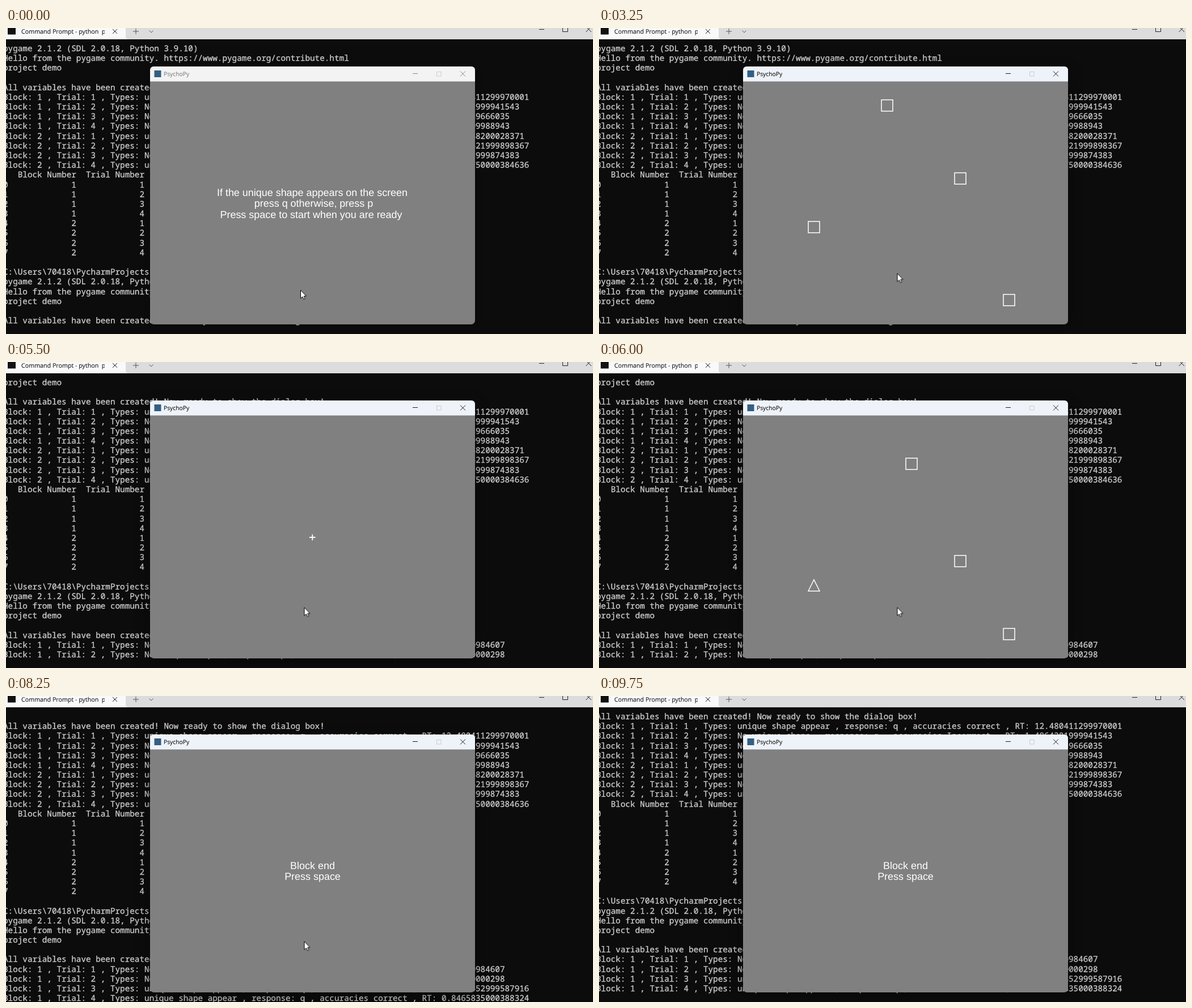
Write an HTML page that moves like this. It is 1035 by 541 pixels and loops after 10000 ms.

```html
<!DOCTYPE html>
<html lang="en">
<head>
<meta charset="utf-8">
<title>Search task</title>
<style>
  html, body { margin: 0; width: 100%; height: 100%; overflow: hidden; background: #0c0c0c; }
  svg { display: block; width: 1035px; height: 541px; }
  text { white-space: pre; text-rendering: geometricPrecision; }

  .log {
    font: 14.325px "Noto Sans Mono", "DejaVu Sans Mono", monospace;
    fill: #d0d0d0; stroke: #d0d0d0; stroke-width: .3; font-variant-ligatures: none;
  }
  .ui { font-family: "Open Sans", "Noto Sans", sans-serif; }
  .ui text { stroke: currentColor; stroke-width: .15; }
  .message { font: 17.95px "Liberation Sans", Arial, sans-serif; fill: #fff; text-anchor: middle; }
  .line { fill: none; stroke: currentColor; }
  .stimulus { fill: none; stroke: #fff; stroke-width: 1.5; }

  /* Every change is a hard cut on one shared ten-second clock. */
  .log, .cover, .pointer, .window, .frame, .bar, .scene {
    animation: 10s step-end infinite;
  }
  .scene { visibility: hidden; }
  .log { animation-name: scroll; }
  .cover { animation-name: cover; }
  .pointer { animation-name: pointer; }
  .window { animation-name: ink; }
  .frame { animation-name: shadow; }
  .bar { animation-name: bar; }
  .intro { animation-name: intro; }
  .begin { animation-name: begin; }
  .cross { animation-name: cross; }
  .end { animation-name: end; }
  .trial1 { animation-name: trial1; }
  .trial2 { animation-name: trial2; }
  .trial3 { animation-name: trial3; }
  .trial4 { animation-name: trial4; }

  @keyframes scroll {
    0% { transform: translateY(0); }
    42.5% { transform: translateY(-17.18px); }
    55% { transform: translateY(-34.36px); }
    70% { transform: translateY(-51.54px); }
    85%, 100% { transform: translateY(-68.72px); }
  }
  @keyframes cover {
    0%, 85%, 100% { visibility: visible; }
    82.5% { visibility: hidden; }
  }
  @keyframes pointer {
    0% { transform: translate(519px, 463px); visibility: visible; }
    2.5% { transform: translate(525.5px, 433.5px); visibility: visible; }
    97.5%, 100% { transform: translate(525.5px, 433.5px); visibility: hidden; }
  }
  @keyframes ink {
    0% { color: #858585; }
    12.5% { color: #444; }
    15%, 100% { color: #1a1a1a; }
  }
  @keyframes shadow {
    0% { filter: drop-shadow(0 2px 5px rgba(0, 0, 0, .3)); }
    12.5%, 100% { filter: drop-shadow(0 6px 12px rgba(0, 0, 0, .4)); }
  }
  @keyframes bar {
    0% { fill: #f3f3f3; }
    12.5% { fill: #f0f3f7; }
    15%, 100% { fill: #eef3f9; }
  }
  @keyframes intro { 0% { visibility: visible; } 17.5%, 100% { visibility: hidden; } }
  @keyframes begin { 0%, 27.5%, 100% { visibility: hidden; } 17.5% { visibility: visible; } }
  @keyframes cross {
    0%, 32.5%, 47.5%, 60%, 75%, 100% { visibility: hidden; }
    27.5%, 42.5%, 55%, 70% { visibility: visible; }
  }
  @keyframes trial1 { 0%, 42.5%, 100% { visibility: hidden; } 32.5% { visibility: visible; } }
  @keyframes trial2 { 0%, 55%, 100% { visibility: hidden; } 47.5% { visibility: visible; } }
  @keyframes trial3 { 0%, 70%, 100% { visibility: hidden; } 60% { visibility: visible; } }
  @keyframes trial4 { 0%, 82.5%, 100% { visibility: hidden; } 75% { visibility: visible; } }
  @keyframes end { 0% { visibility: hidden; } 82.5%, 100% { visibility: visible; } }
</style>
</head>
<body>
<svg viewBox="0 0 1035 541">
  <defs>
    <clipPath id="tabTitle"><rect width="174" height="20"/></clipPath>
    <path id="square" d="M1 -10H21V10H1Z"/>
    <path id="triangle" d="M1 10L11 -10L21 10Z"/>
  </defs>
  <rect width="1035" height="541" fill="#0c0c0c"/>
  <g class="log"></g>
  <rect class="cover" y="527" width="1035" height="14" fill="#0c0c0c"/>
  <rect y="20" width="1035" height="8.5" fill="#0c0c0c"/>

  <g class="ui" color="#222">
    <rect width="1035" height="20" fill="#dcdcdc"/>
    <path d="M0 0H211V15Q211 20 216 20H0Z" fill="#f9f9f9"/>
    <rect x="3" y="0" width="14" height="11.5" fill="#111"/>
    <text x="27" y="10" font-size="10.7" fill="currentColor" clip-path="url(#tabTitle)">Command Prompt - python  p</text>
    <path class="line" d="M188 2L196 10M196 2L188 10M940 2.500H949M981.500 -3V6.500H990.500V-3M1022.500 -2.500L1032 7M1032 -2.500L1022.500 7"/>
    <path class="line" color="#555" d="M224 6H234M229 1V11M252.500 4.500L256 8L259.500 4.500"/>
  </g>

  <g class="window ui">
    <rect class="frame" x="254" y="68" width="573" height="456" rx="7" fill="#808080"/>
    <path class="bar" d="M254 94.500V75Q254 68 261 68H820Q827 68 827 75V94.500Z"/>
    <rect x="261.500" y="75" width="12" height="12" fill="#355f80"/>
    <text x="278" y="85" font-size="10.3" fill="currentColor">PsychoPy</text>
    <path class="line" d="M717 80.500H726M801 76.500L810 85.500M810 76.500L801 85.500"/>
    <rect x="759.500" y="77.500" width="7.500" height="7.500" fill="none" stroke="#ccc"/>
  </g>

  <g class="message">
    <g class="scene intro">
      <text x="540" y="296.700">If the unique shape appears on the screen</text>
      <text x="542.5" y="316.200">press q otherwise, press p</text>
      <text x="538" y="335.600">Press space to start when you are ready</text>
    </g>
    <text class="scene begin" x="540.5" y="316.500">Begin Block 1</text>
    <path class="scene cross" d="M535 310H545.500M540.250 304.800V315.200" stroke="#fff" stroke-width="1.800"/>
    <g class="scene end">
      <text x="540.5" y="306">Block end</text>
      <text x="540.5" y="325.400">Press space</text>
    </g>
  </g>
  <g class="stimuli"></g>
  <path class="pointer" d="M.5 .5V15L3.800 12L6 16.700L8.300 15.700L6.200 11H10.500Z" fill="#fff" stroke="#000" stroke-linejoin="round"/>
</svg>
<script>
  const svgNode = (tag, attributes, parent, text = "") => {
    const node = document.createElementNS("http://www.w3.org/2000/svg", tag);
    for (const [key, value] of Object.entries(attributes)) node.setAttribute(key, value);
    node.textContent = text;
    return parent.appendChild(node);
  };

  const trialLine = (block, trial, unique, key, correct, time) =>
    `Block: ${block} , Trial: ${trial} , Types: ${unique ? "unique shape appear" : "No unique shape"}` +
    ` , response: ${key} , accuracies ${correct ? "correct" : "Incorrect"} , RT: ${time}`;

  const greeting = [
    "pygame 2.1.2 (SDL 2.0.18, Python 3.9.10)",
    "Hello from the pygame community. https://www.pygame.org/contribute.html",
    "project demo",
    "",
    "All variables have been created! Now ready to show the dialog box!",
  ];
  const gap = " ".repeat(13);
  const lines = [
    ...greeting,
    trialLine(1, 1, true, "q", true, "12.480411299970001"),
    trialLine(1, 2, false, "q", false, "1.4864381999941543"),
    trialLine(1, 3, false, "p", true, "0.7329415989666035"),
    trialLine(1, 4, false, "p", true, "0.6184027599988943"),
    trialLine(2, 1, true, "q", true, "0.915348200028371"),
    trialLine(2, 2, true, "q", true, "0.7740621999898367"),
    trialLine(2, 3, false, "q", false, "0.6925183999874383"),
    trialLine(2, 4, true, "q", true, "0.8130750000384636"),
    "   Block Number  Trial Number",
    ...Array.from({ length: 8 }, (_, i) => i + gap + (i < 4 ? 1 : 2) + gap + (i % 4 + 1)),
    "",
    "C:\\Users\\70418\\PycharmProjects\\demo>python project.py",
    ...greeting,
    trialLine(1, 1, false, "p", true, "0.942716300984607"),
    trialLine(1, 2, false, "p", true, "0.681539400000298"),
    trialLine(1, 3, true, "q", true, "0.9027452999587916"),
    trialLine(1, 4, true, "q", true, "0.8465835000388324"),
  ];
  const log = document.querySelector(".log");
  lines.forEach((line, row) => svgNode("text", { x: -5, y: 41 + row * 17.18 }, log, line));

  // Grid cells around the fixation cross; the first cell holds the odd shape when there is one.
  const trials = [
    { odd: "square", cells: [[-4, 1], [-1, -4], [2, -1], [4, 4]] },
    { odd: "square", cells: [[-2, 1], [1, -2], [3, 0], [4, 4]] },
    { odd: "triangle", cells: [[-4, 2], [0, -3], [2, 1], [4, 4]] },
    { odd: "triangle", cells: [[1, -3], [-3, -1], [-1, 3], [4, 4]] },
  ];
  trials.forEach(({ odd, cells }, index) => {
    const group = svgNode("g", { class: `stimulus scene trial${index + 1}` }, document.querySelector(".stimuli"));
    cells.forEach(([column, row], i) =>
      svgNode("use", { href: i ? "#square" : "#" + odd, x: 540 + 43 * column, y: 309 + 43 * row }, group));
  });
</script>
</body>
</html>
```
